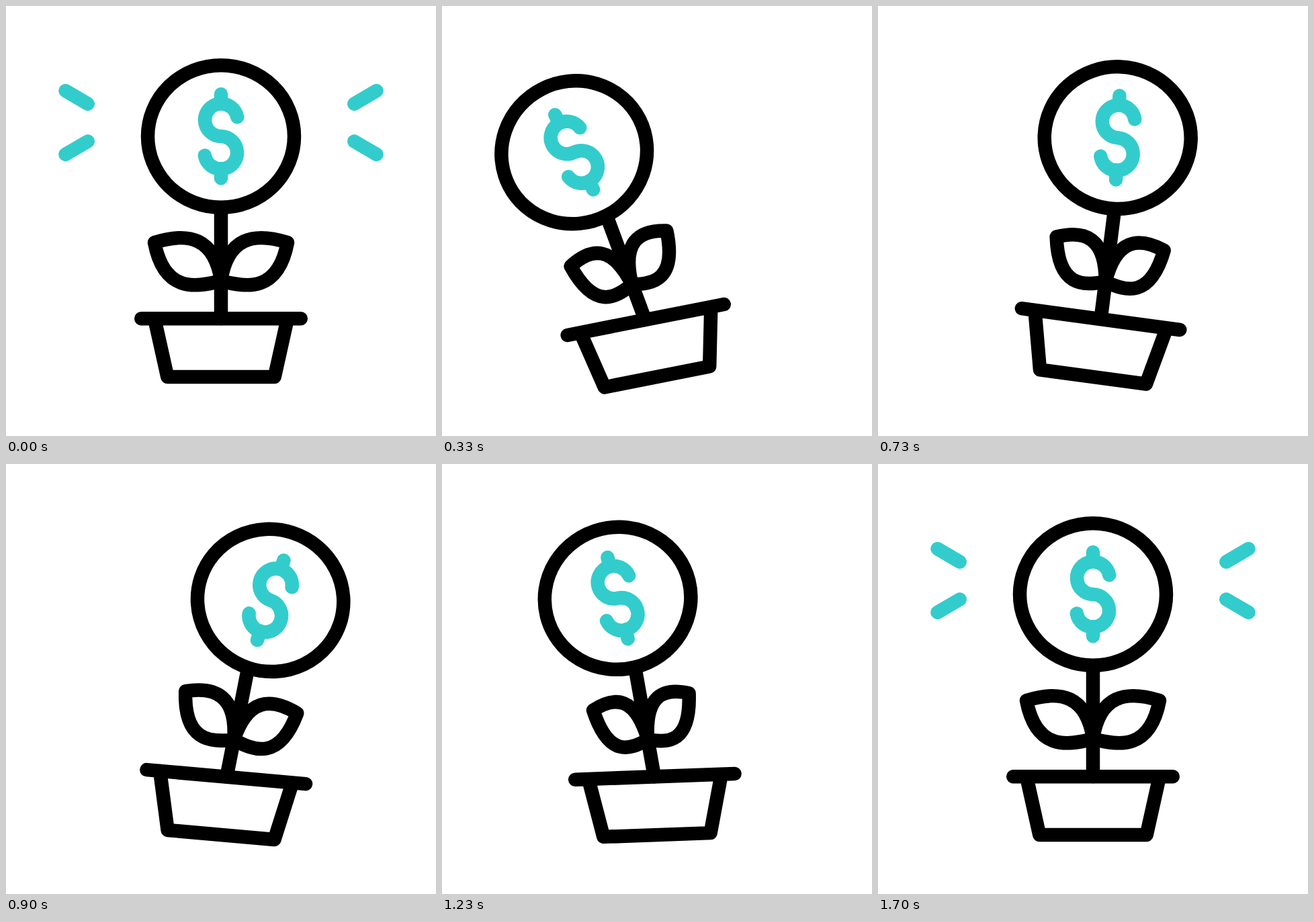
Recreate the animation shown at these times as an HTML page. Size 640 by 640 pixels, loop 2000 ms.

```html
<!DOCTYPE html>
<html lang="en">
<head>
<meta charset="utf-8">
<title>Money plant</title>
<style>
  html, body { margin: 0; width: 100%; height: 100%; overflow: hidden; background: #fff; }
  svg { display: block; width: 100vw; height: 100vh; }
  svg * { fill: none; stroke-width: 20.5; stroke-linecap: round; stroke-linejoin: round; }
  .ink { stroke: #000; }
  .teal { stroke: #33cccc; }
</style>
</head>
<body>
<svg viewBox="0 0 640 640">
  <path id="sparks" class="teal"/>
  <g id="pot" class="ink">
    <path d="M221 465.3L240.3 552H399.7L419 465.3M201.2 465.3H438.8"/>
    <g id="stem">
      <path d="M320 300V465"/>
      <path id="leaves"/>
      <g id="coin">
        <ellipse cx="320" cy="194" rx="109" ry="105.8"/>
        <path class="teal" d="M344.2 165.3A24.3 24.3 0 1 0 320 194A24.3 24.3 0 1 1 295.8 222.5M320 131.3V145M320 242V256.3"/>
      </g>
    </g>
  </g>
</svg>
<script>
const LOOP = 2000, FPS = 30, LAST = 51, BEAT = 10;
const $ = id => document.getElementById(id);

// Eases in and out between [step, value] keys.
function ease(keys, step) {
  const next = keys.findIndex(key => key[0] > step);
  if (next < 0) return keys[keys.length - 1][1];
  if (next === 0) return keys[0][1];
  const [s0, v0] = keys[next - 1], [s1, v1] = keys[next];
  const p = (step - s0) / (s1 - s0);
  return v0 + (v1 - v0) * p * p * (3 - 2 * p);
}

// One swing from rest through the peaks, a beat apart, and back to rest.
const swing = (first, ...peaks) =>
  [[0, 0], ...[...peaks, 0].map((angle, i) => [first + i * BEAT, angle])];

// Each part hangs on the one before it and follows a little later.
const joints = [
  { id: 'pot', pivotY: 552, keys: swing(13.3, -13.2, 8.7, -3) },
  { id: 'stem', pivotY: 471, keys: swing(16, -13.4, 6.5, -8.2) },
  { id: 'coin', pivotY: 300, keys: swing(18, -11.5, 7.7, -4.3) }
];
const leafSpread = [[6.5, 1], [16.5, 0.18], [24, 0.95], [32, 0.65], [48, 1]];
const sparkReach = [[0, 1], [7, 0], [44, 0], [LAST, 1]];

function leaf(spread) {
  const at = (x, y) => `${320 + x * spread} ${y} `;
  return `M${at(0, 408)}C${at(10, 345)}${at(48, 336)}${at(99, 352)}`
    + `C${at(85, 425)}${at(40, 420)}${at(0, 409)}Z`;
}

// A pair of sparks on one side: -1 is left, 1 is right.
function sparkPair(side, reach) {
  const x0 = 320 + side * 198.3, dx = side * 33.2 * reach, dy = 19.4 * reach;
  return `M${x0} 145.6l${dx} ${-dy}M${x0} 201.5l${dx} ${dy}`;
}

function draw(ms) {
  const step = Math.min(LAST, Math.floor((ms + 5) * FPS / 1000));
  for (const { id, pivotY, keys } of joints) {
    $(id).setAttribute('transform', `rotate(${ease(keys, step)} 320 ${pivotY})`);
  }
  const spread = ease(leafSpread, step);
  $('leaves').setAttribute('d', leaf(spread) + leaf(-spread));

  const reach = ease(sparkReach, step);
  $('sparks').setAttribute('d', reach > 0 ? sparkPair(-1, reach) + sparkPair(1, reach) : '');
}

const start = performance.now();
function tick() {
  draw((performance.now() - start) % LOOP);
  requestAnimationFrame(tick);
}
draw(0);
requestAnimationFrame(tick);
</script>
</body>
</html>
```
